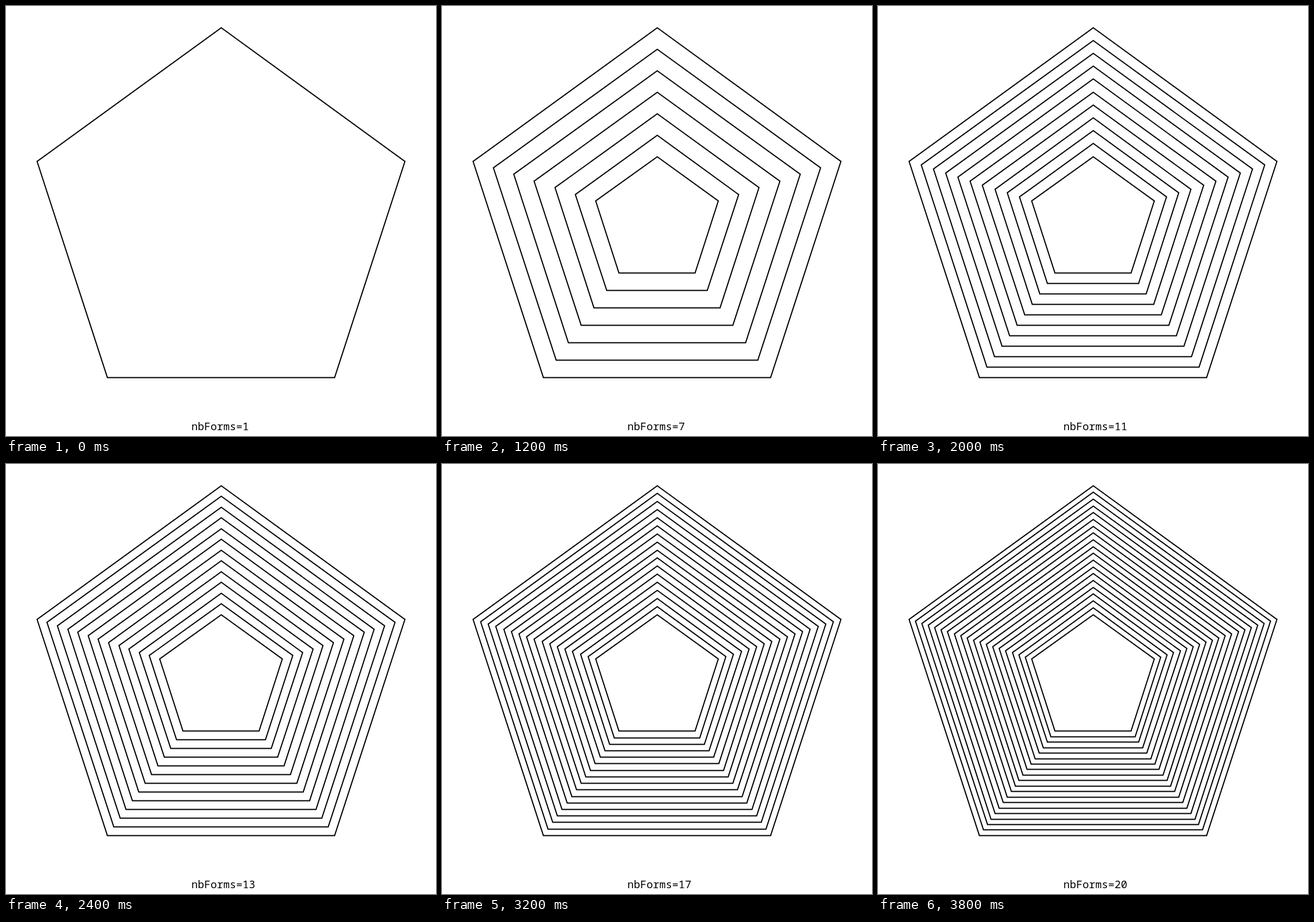
These frames come from a looping animation (740x740 px, 4 s). An HTML page:

```html
<!DOCTYPE html>
<html lang="en">
<head>
<meta charset="utf-8">
<title>Nested pentagons</title>
<style>
  html, body { margin: 0; width: 100%; height: 100%; overflow: hidden; background: #fff; }
  svg { display: block; width: 740px; height: 740px; }
  path { fill: none; stroke: #000; stroke-width: 2; stroke-linejoin: miter; }
  text { font: 18.33px "Noto Sans Mono", "DejaVu Sans Mono", monospace; fill: #000; }
</style>
</head>
<body>
<svg viewBox="0 0 740 740">
  <path id="forms"/>
  <text id="label" x="319" y="730"></text>
</svg>
<script>
  const SIZE = 740, CENTER = SIZE / 2, OUTER = SIZE * 0.45, INNER = SIZE * 0.15;
  const SIDES = 5, STEPS = 20, STEP_MS = 200;
  const forms = document.getElementById('forms');
  const label = document.getElementById('label');

  // Vertices sit on pixel centres.
  const snap = v => Math.floor(v + 1e-6) + 0.5;

  function pentagon(radius) {
    const points = Array.from({ length: SIDES }, (_, i) => {
      const a = i * 2 * Math.PI / SIDES - Math.PI / 2;
      return snap(CENTER + radius * Math.cos(a)) + ' ' + snap(CENTER + radius * Math.sin(a));
    });
    return 'M' + points.join('L') + 'Z';
  }

  function draw(count) {
    const gap = count > 1 ? (OUTER - INNER) / (count - 1) : 0;
    let d = '';
    for (let i = 0; i < count; i++) d += pentagon(OUTER - i * gap);
    forms.setAttribute('d', d);
    label.textContent = 'nbForms=' + count;
  }

  const start = performance.now();
  let shown = 0;
  function tick() {
    const count = Math.floor((performance.now() - start) / STEP_MS) % STEPS + 1;
    if (count !== shown) draw(shown = count);
    requestAnimationFrame(tick);
  }
  tick();
</script>
</body>
</html>
```
